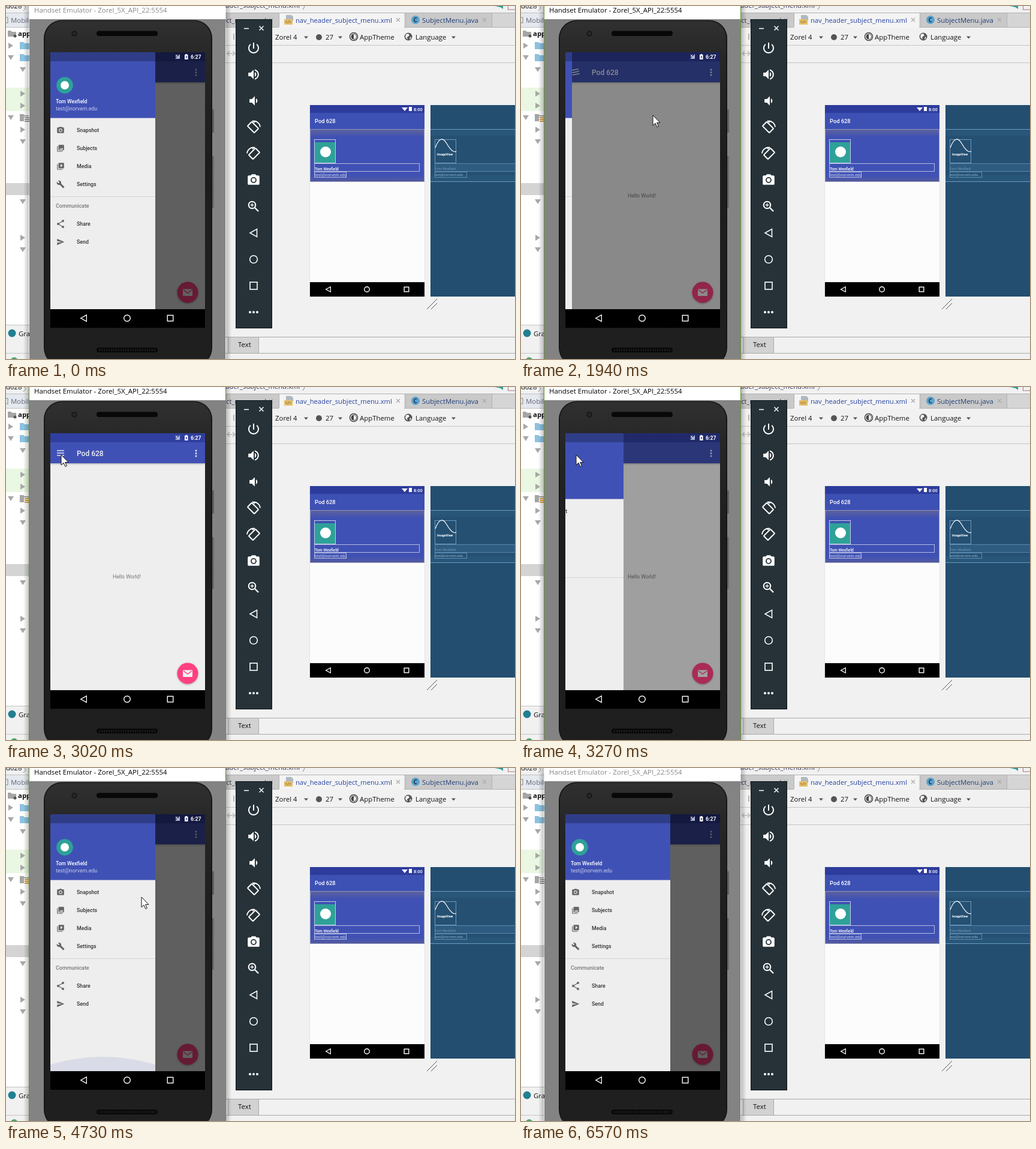
Animation of 849 by 588 pixels, one loop 6650 ms. Source, as an HTML page:

```html
<!DOCTYPE html>
<html lang="en">
<head>
<meta charset="utf-8">
<style>
html, body { margin: 0; width: 100%; height: 100%; overflow: hidden; background: #f1f1f1; }
svg { display: block; width: 849px; height: 588px; }
text { font-family: "Open Sans", sans-serif; white-space: pre; }
.r { font-family: Roboto, sans-serif; }
</style>
</head>
<body>
<svg id="stage" viewBox="0 0 849 588"></svg>
<script>
const NAME = 'Tom Wexfield', MAIL = 'test@norvem.edu', APP = 'Pod 628';

const rect = (x, y, w, h, fill, more = '') =>
  `<rect x="${x}" y="${y}" width="${w}" height="${h}" fill="${fill}" ${more}/>`;
const frame = (x, y, w, h, color, width = 1) =>
  rect(x, y, w, h, 'none', `stroke="${color}" stroke-width="${width}"`);
const circle = (x, y, r, fill, more = '') => `<circle cx="${x}" cy="${y}" r="${r}" fill="${fill}" ${more}/>`;
const path = (d, fill, more = '') => `<path d="${d}" fill="${fill}" ${more}/>`;
const line = (d, color, width = 1, more = '') =>
  path(d, 'none', `stroke="${color}" stroke-width="${width}" ${more}`);
const text = (x, y, s, size = 11.4, fill = '#111', more = '') =>
  `<text x="${x}" y="${y}" font-size="${size}" fill="${fill}" ${more}>${s}</text>`;
const roboto = (x, y, s, size, fill, weight = 400) =>
  text(x, y, s, size, fill, `class="r" font-weight="${weight}"`);
const at = (x, y, scale, body, turn = 0) =>
  `<g transform="translate(${x} ${y}) rotate(${turn}) scale(${scale})">${body}</g>`;
// Icons are drawn on a 24 unit grid around their centre.
const icon = (d, x, y, scale, fill) => at(x, y, scale, path(d, fill, 'transform="translate(-12 -12)"'));

const POWER = 'M13 3h-2v10h2V3zm4.83 2.17l-1.42 1.42C17.99 7.86 19 9.81 19 12c0 3.87-3.13 7-7 7s-7-3.13-7-7c0-2.19 1.01-4.14 2.58-5.42L6.17 5.17C4.23 6.82 3 9.26 3 12c0 4.97 4.03 9 9 9s9-4.03 9-9c0-2.74-1.23-5.18-3.17-6.83z';
const LOUD = 'M3 9v6h4l5 5V4L7 9H3zm13.5 3c0-1.77-1.02-3.29-2.5-4.03v8.05c1.48-.73 2.5-2.25 2.5-4.02zM14 3.23v2.06c2.89.86 5 3.54 5 6.71s-2.11 5.85-5 6.71v2.06c4.01-.91 7-4.49 7-8.77s-2.99-7.86-7-8.77z';
const QUIET = 'M18.5 12c0-1.77-1.02-3.29-2.5-4.03v8.05c1.48-.73 2.5-2.25 2.5-4.02zM5 9v6h4l5 5V4L9 9H5z';
const CAMERA = 'M12 8.8a3.2 3.2 0 1 0 0 6.4a3.2 3.2 0 0 0 0-6.4zM9 2L7.17 4H4c-1.1 0-2 .9-2 2v12c0 1.1.9 2 2 2h16c1.1 0 2-.9 2-2V6c0-1.1-.9-2-2-2h-3.17L15 2H9zm3 15c-2.76 0-5-2.24-5-5s2.24-5 5-5 5 2.24 5 5-2.24 5-5 5z';
const PHOTOS = 'M22 16V4c0-1.1-.9-2-2-2H8c-1.1 0-2 .9-2 2v12c0 1.1.9 2 2 2h12c1.1 0 2-.9 2-2zm-11-4l2.03 2.71L16 11l4 5H8l3-4zM2 6v14c0 1.1.9 2 2 2h14v-2H4V6H2z';
const VIDEOS = 'M4 6H2v14c0 1.1.9 2 2 2h14v-2H4V6zm16-4H8c-1.1 0-2 .9-2 2v12c0 1.1.9 2 2 2h12c1.1 0 2-.9 2-2V4c0-1.1-.9-2-2-2zm-8 12.5v-9l6 4.5-6 4.5z';
const WRENCH = 'M22.7 19l-9.1-9.1c.9-2.3.4-5-1.5-6.9-2-2-5-2.4-7.4-1.3L9 6 6 9 1.6 4.7C.4 7.1.9 10.1 2.9 12.1c1.9 1.9 4.6 2.4 6.9 1.5l9.1 9.1c.4.4 1 .4 1.4 0l2.3-2.3c.5-.4.5-1.1.1-1.4z';
const SEND = 'M2.01 21L23 12 2.01 3 2 10l15 2-15 2z';

const navKeys = (y, back, home, recent, s) =>
  line(`M${back + 5 * s} ${y - 5 * s}v${10 * s}l${-9 * s} ${-5 * s}z`, '#fff', 1.3) +
  circle(home, y, 5 * s, 'none', 'stroke="#fff" stroke-width="1.4"') +
  frame(recent - 4.5 * s, y - 4.5 * s, 9 * s, 9 * s, '#fff', 1.4);

function projectTree() {
  const right = (x, y) => path(`M${x - 4} ${y - 5}l8 5l-8 5z`, '#a8a8a8');
  const down = (x, y) => path(`M${x - 5} ${y - 4}h10l-5 8z`, '#a8a8a8');
  const folder = y => path(`M23 ${y - 6}h6l2 2h8v10h-16z`, '#8dc3e0');
  return rect(0, 0, 39, 588, '#fff') + rect(0, 0, 39, 11, '#f1f1f1') +
    rect(0, 11, 39, 24, '#e4e9ef') + line('M0 11.5h39M0 35.5h39', '#c0c0c0') +
    text(-7, 4, 'od628') + line('M29 -2l4 5l-4 5', '#888') +
    frame(-3, 19, 6, 9, '#888') + text(8, 28, 'Mobile', 11.4, '#667') +
    path('M3 41h5l2 2h7v8H3z', '#a5a5a5') + circle(15, 50, 2.5, '#555') +
    text(20, 50, 'app', 11.4, '#111', 'font-weight="700"') +
    rect(0, 136, 39, 39, '#eaf7e3') + rect(0, 295, 39, 20, '#d4d4d4') +
    right(8, 66) + down(8, 86) + folder(66) + folder(86) + down(8, 186) +
    [146, 166, 206, 386].map(y => right(28, y)).join('') +
    [106, 226, 326, 406].map(y => down(28, y)).join('') +
    path('M23 180h6l2 2h7v10H23z', '#a5a5a5') +
    '<g id="lines">' + rect(30, 184, 9, 9, '#fff') + line('M31 186h8M31 189h8M31 192h8', 'currentColor', 2) + '</g>' +
    rect(0, 532, 39, 56, '#f1f1f1') + line('M0 531.5h39M0 578.5h39', '#c4c4c4') +
    circle(10, 545, 6.5, '#227f91') + text(21, 550, 'Gradle') + path('M8 588q6 -6 11 0z', '#4aa564');
}

function editor() {
  const drop = x => path(`M${x} 50.5h7l-3.5 4z`, '#555');
  const close = x => line(`M${x} 20l6 6m0 -6l-6 6`, '#aaa', 1.2);
  const end = 'text-anchor="end"';
  return rect(366, 0, 483, 588, '#f1f1f1') +
    text(490, 3, 'nav_header_subject_menu.xml', 11.2, '#335', end) + line('M495 -3l3 4l-3 5', '#888') +
    path('M815 0h14v5l-4 -3z', '#2a9a8c') + frame(837.5, -4, 15, 10, '#a77') +
    rect(366, 11, 483, 24, '#d5d5d5') + rect(366, 12, 89, 23, '#cacaca') +
    rect(456, 12, 208, 24, '#f4f4f4') + rect(667, 12, 143, 23, '#c9c9c9') +
    line('M366 11.5H849M366 35.5H455M664 35.5H849M455.5 12v23M666.5 12v23M810.5 12v23', '#b2b2b2') +
    text(434, 28, 'content_subject_menu.xml', 11.2, '#335', end) + close(439) +
    path('M467 15h9l3 3v7h-12z', '#aeb9c1') + rect(464, 22, 14, 9, '#e7be68') +
    text(465.5, 29, '&lt;/&gt;', 7, '#553') +
    text(483, 28, 'nav_header_subject_menu.xml', 11.2, '#2743a0') + close(651) +
    circle(683, 23, 7, '#58a3cf') + text(679.5, 27, 'C', 10, '#234', 'font-weight="700"') +
    text(694, 28, 'SubjectMenu.java', 11.4, '#234078') + close(795) +
    line('M366 65.5H849M366 94.5H849', '#c5c5c5') +
    line('M380 46v10M385 46v10', '#777') +
    line('M369 79h13m-9 -4l-4 4l4 4m5 -8l4 4l-4 4', '#bbb', 1.5) +
    text(449, 56, 'Zorel 4') + drop(497) + circle(522, 52, 5, '#555') + text(533, 56, '27') + drop(554) +
    circle(580, 51, 6.5, '#fff', 'stroke="#444" stroke-width="1.5"') +
    path('M580 46.5a4.5 4.5 0 0 0 0 9z', '#444') + line('M580 46.5a4.5 4.5 0 0 1 0 9', '#444') +
    text(590, 56, 'AppTheme') +
    circle(671, 51, 6.5, '#555') + path('M667 47l4 -1l2 3l-4 3l1 4l-4 -4zM674 51l2 2l-3 3z', '#f1f1f1') +
    text(683, 56, 'Language') + drop(743) +
    preview() + blueprint() + line('M702 505l17 -17M709 505l10 -10', '#555') +
    rect(370, 552, 52, 26, '#d2d2d2') + line('M366 551.5H849M366 578.5H849M370.5 552v26M421.5 552v26', '#aaa') +
    text(387, 568, 'Text');
}

function preview() {
  return rect(506.5, 165, 192, 319.5, '#dcdcdc') +
    rect(507, 165, 191, 13, '#2d3c9c') + rect(507, 178, 191, 28, '#3d50b4') +
    rect(507, 206, 191, 87, 'url(#edge)') + rect(507, 293, 191, 167, '#fcfcfc') +
    path('M660 169h10l-5 6z', '#fff') + rect(672, 168, 5, 7, '#fff') +
    roboto(680, 175, '8:00', 7.5, '#fff', 500) + roboto(515, 195, APP, 9.3, '#fff', 500) +
    rect(515, 227, 35, 35, '#2fa199') + circle(533, 243, 9, '#fff') +
    frame(507.5, 205.5, 190, 87, '#8f93b8') + frame(514.5, 222.5, 35, 39, '#c6cce8') +
    frame(514.5, 262.5, 175, 13, '#b5bce2') + frame(514.5, 276.5, 53, 9, '#b5bce2') +
    roboto(515, 273.5, NAME, 6.6, '#fff', 500) + roboto(515, 283.5, MAIL, 6.8, '#cbd1ee') +
    rect(507, 460, 191, 24, '#000') + navKeys(472, 537, 602, 668, .85);
}

function blueprint() {
  const c = '#6d9ac0';
  return rect(708, 165, 141, 319, '#244e6f') + rect(708, 206, 141, 87, '#285679') +
    rect(708, 216, 141, 66, '#255072') + line('M708 205.5h141M708 292.5h141', c) +
    frame(715.5, 222.5, 35, 39, c) + line('M716 236q9 -24 19 -7t16 13', '#fff', 1.2) +
    roboto(719, 249, 'ImageView', 5.3, '#fff', 700) +
    path('M849 262.5H715.5v13H849', '#2d5c80', `stroke="${c}" stroke-width=".7"`) + frame(715.5, 276.5, 53, 9, c, .8) +
    roboto(715, 273, NAME, 5.8, '#7599b8') + roboto(715, 283, MAIL, 6, '#8db0cd');
}

function remote() {
  // A tilted handset with an arrow curving over its upper corner.
  const tilted = (y, side) => `<g transform="translate(413 ${y}) scale(${side} 1)">` +
    at(-1, 0, 1, rect(-5, -8, 10, 16, 'none', 'stroke="#fff" stroke-width="2" rx="1"'), -45) +
    line('M0 -10.5a11 11 0 0 1 11 10M-2 -11l4 3', '#fff', 1.8) + '</g>';
  return rect(383.5, 22.5, 60, 514, '#263238', 'stroke="#0e1518"') +
    line('M397 37.5h8M422.5 33.5l7 7m0 -7l-7 7', '#fff', 1.5) +
    icon(POWER, 413, 70, 1, '#fff') + icon(LOUD, 413, 114, .98, '#fff') + icon(QUIET, 413, 158, .98, '#fff') +
    tilted(202, 1) + tilted(246, -1) + icon(CAMERA, 413, 290, .98, '#fff') +
    circle(410.5, 331.5, 5.8, 'none', 'stroke="#fff" stroke-width="2"') +
    line('M415 336l6 6', '#fff', 2.4) + line('M407.5 331.5h6m-3 -3v6', '#fff', 1.3) +
    line('M418.5 371.5v13l-11.5 -6.5z', '#fff', 1.6) + circle(413, 422, 6.3, 'none', 'stroke="#fff" stroke-width="1.6"') +
    frame(407, 460, 12, 12, '#fff', 1.6) + [407, 413, 419].map(x => circle(x, 510, 2, '#fff')).join('');
}

function drawer() {
  const share = line('M95 358l-8 5l8 5', '#666', 1.2) +
    circle(95, 358, 2, '#666') + circle(87, 363, 2, '#666') + circle(95, 368, 2, '#666');
  const rows = [['Snapshot', CAMERA], ['Subjects', PHOTOS], ['Media', VIDEOS], ['Settings', WRENCH]];
  const label = (y, s) => roboto(118, y + 3, s, 8.8, '#333', 500);
  return rect(74, 77, 175, 428, '#eee') +
    rect(74, 77, 175, 109.6, '#4051b5') + rect(74, 77, 175, 15, '#2f3d88') +
    circle(98, 132, 13.8, '#2fa199') + circle(98, 132, 7, '#fff') +
    roboto(83, 162, NAME, 8.7, '#fff', 500) + roboto(83, 174, MAIL, 8.8, '#c5cbe9') +
    rows.map(([s, d], i) => icon(d, 91, 207 + i * 30, .58, '#666') + label(207 + i * 30, s)).join('') +
    line('M74 317.5h175', '#d5d5d5') + roboto(83, 336, 'Communicate', 8.9, '#777', 500) +
    share + label(363, 'Share') + icon(SEND, 91, 393, .58, '#666') + label(393, 'Send') +
    path('M74 494Q161 468 249 494V505H74z', '#4051b5', 'id="glow"');
}

function phone() {
  const dots = [106, 110.5, 115].map(y => circle(317, y, 1.5, '#e4e6f4')).join('');
  return rect(367, 0, 9, 588, 'url(#shade)') + rect(29, 0, 9, 588, 'url(#shade)', 'transform="matrix(-1 0 0 1 67 0)"') +
    rect(39, 0, 327, 22, '#fff') + rect(39, 22, 327, 566, '#838383') +
    text(47, 11, 'Handset Emulator - Zorel_5X_API_22:5554', 11.45, '#000', 'id="title"') +
    line('M38.5 0v588M366.5 0v588', '#62932f', 1, 'id="border"') +
    rect(344, 172, 3, 39, '#606060') + rect(344, 250, 2.5, 86, '#66635c') +
    rect(63, 23.5, 281, 576, '#161616', 'rx="30"') + rect(65, 25, 277, 573, 'url(#body)', 'rx="28"') +
    circle(114, 46, 5, '#1c1c1c') + circle(114, 46, 2, '#24303c') +
    rect(151, 41.5, 102, 8.5, '#080808', 'rx="4"') +
    rect(151, 569, 102, 8, '#080808', 'rx="4"') + line('M155 573h94', '#1c1c1c', 4, 'stroke-dasharray="2 2"') +
    '<g clip-path="url(#screen)">' +
    rect(74, 77, 258, 428, '#eee') + rect(74, 92, 258, 35, '#4051b5', 'filter="url(#soft)"') +
    rect(74, 77, 258, 15, '#303f9f') +
    '<g id="burger">' + line('M-6 -4h12M-6 0h12M-6 4h12', '#e4e6f4', 1.5) + '</g>' +
    roboto(118, 115, APP, 12, '#f0f1fa', 500) + dots +
    roboto(178, 319, 'Hello World!', 8.7, '#777') +
    circle(303, 477, 17.5, '#ff4081', 'filter="url(#soft)"') +
    rect(295, 471.5, 16, 11.5, '#f4f0f2', 'rx="1"') + line('M296 473l7 5l7 -5', '#ff4081', 1.5) +
    rect(74, 77, 258, 428, '#000', 'id="scrim"') + '<g id="drawer">' + drawer() + '</g>' +
    path('M290 80v8h-8z', '#aeb4d8') + line('M283 81l3 4m0 -4l-3 4', '#fff') +
    rect(298, 81, 5.5, 8, '#fff') + rect(299.5, 80, 2.5, 1, '#fff') + rect(300, 83, 1.5, 4, '#303f9f') +
    roboto(308, 88, '6:27', 8.7, '#fff', 700) + '</g>' +
    rect(74, 505, 258, 31, '#000') + navKeys(520, 129, 202, 274, 1.06);
}

const stage = document.getElementById('stage');
stage.innerHTML = `<defs>
  <clipPath id="screen"><rect x="74" y="77" width="258" height="428"/></clipPath>
  <filter id="soft" x="-20%" y="-20%" width="140%" height="140%">
    <feDropShadow dx="0" dy="1" stdDeviation="1.5" flood-opacity=".35"/></filter>
  <linearGradient id="edge" x2="0" y2="1"><stop stop-color="#5d629d"/><stop offset=".14" stop-color="#3f51b4"/>
    <stop offset=".88" stop-color="#3f51b4"/><stop offset="1" stop-color="#555b9d"/></linearGradient>
  <linearGradient id="shade"><stop stop-opacity=".22"/><stop offset="1" stop-opacity="0"/></linearGradient>
  <linearGradient id="body" x2="0" y2="1"><stop stop-color="#303030"/><stop offset=".12" stop-color="#262626"/>
    <stop offset=".4" stop-color="#1d1d1d"/><stop offset="1" stop-color="#1f1f1f"/></linearGradient>
</defs>` + editor() + projectTree() + phone() + remote() +
  '<g id="cursor">' + path('M0 0v17l4 -3.7l2.9 6.3l2.5 -1.2l-2.8 -6H12z', '#fff', 'stroke="#111"') + '</g>';

// Key points: time, then values; linear between them.
const POINTER = [[390, 521, 455], [540, 521, 455], [780, 224, 168], [930, 224, 168], [1220, 261, 182],
  [1770, 261, 182], [1940, 220, 182], [2170, 288, 179], [2320, 288, 179], [3020, 92, 113],
  [3600, 92, 113], [3810, 124, 153], [4300, 168, 420], [4510, 168, 400], [4590, 180, 340],
  [4730, 226, 215], [4800, 232, 214], [5120, 237, 247], [5190, 237, 247], [5480, 348, 227],
  [5650, 348, 227], [5940, 757, 502], [6020, 757, 502], [6270, 786, 552]];
const OPEN = [[1780, 1], [1850, .6], [1940, .063], [2020, 0], [3150, 0], [3270, .55], [3350, .84], [3430, .949], [3510, 1]];
const SCRIM = [[1780, .6], [1940, .43], [2170, 0], [3150, 0], [3270, .33], [3430, .55], [3510, .6]];
const GLOW = [[4440, 0], [4590, .3], [4730, 1], [4800, 1], [5120, 0]];

function track(keys, t) {
  const i = keys.findIndex(k => k[0] > t);
  if (i === 0) return keys[0].slice(1);
  if (i < 0) return keys[keys.length - 1].slice(1);
  const a = keys[i - 1], b = keys[i], p = (t - a[0]) / (b[0] - a[0]);
  return a.slice(1).map((v, j) => v + (b[j + 1] - v) * p);
}

const part = Object.fromEntries(['title', 'border', 'lines', 'burger', 'scrim', 'drawer', 'glow', 'cursor']
  .map(id => [id, document.getElementById(id)]));
const move = (el, x, y, more = '') => el.setAttribute('transform', `translate(${x} ${y}) ${more}`);

function draw(now) {
  const t = now % 6650, active = t >= 100 && t < 6570;
  const [open] = track(OPEN, t), [glow] = track(GLOW, t);
  part.title.setAttribute('fill', active ? '#000' : '#888');
  part.border.setAttribute('opacity', active ? 1 : 0);
  part.lines.setAttribute('color', active ? '#d8a13f' : '#999');
  part.scrim.setAttribute('opacity', track(SCRIM, t)[0]);
  part.drawer.setAttribute('visibility', open > 0 ? 'visible' : 'hidden');
  move(part.drawer, Math.round((open - 1) * 175), 0);
  move(part.burger, 91, 110, `rotate(${-180 * open})`);
  part.glow.setAttribute('opacity', glow * .12);
  move(part.glow, 0, 505 * (1 - glow), `scale(1 ${glow})`);
  part.cursor.setAttribute('visibility', t >= 390 && t < 6340 ? 'visible' : 'hidden');
  move(part.cursor, ...track(POINTER, t).map(Math.round));
  requestAnimationFrame(draw);
}
requestAnimationFrame(draw);
</script>
</body>
</html>
```
